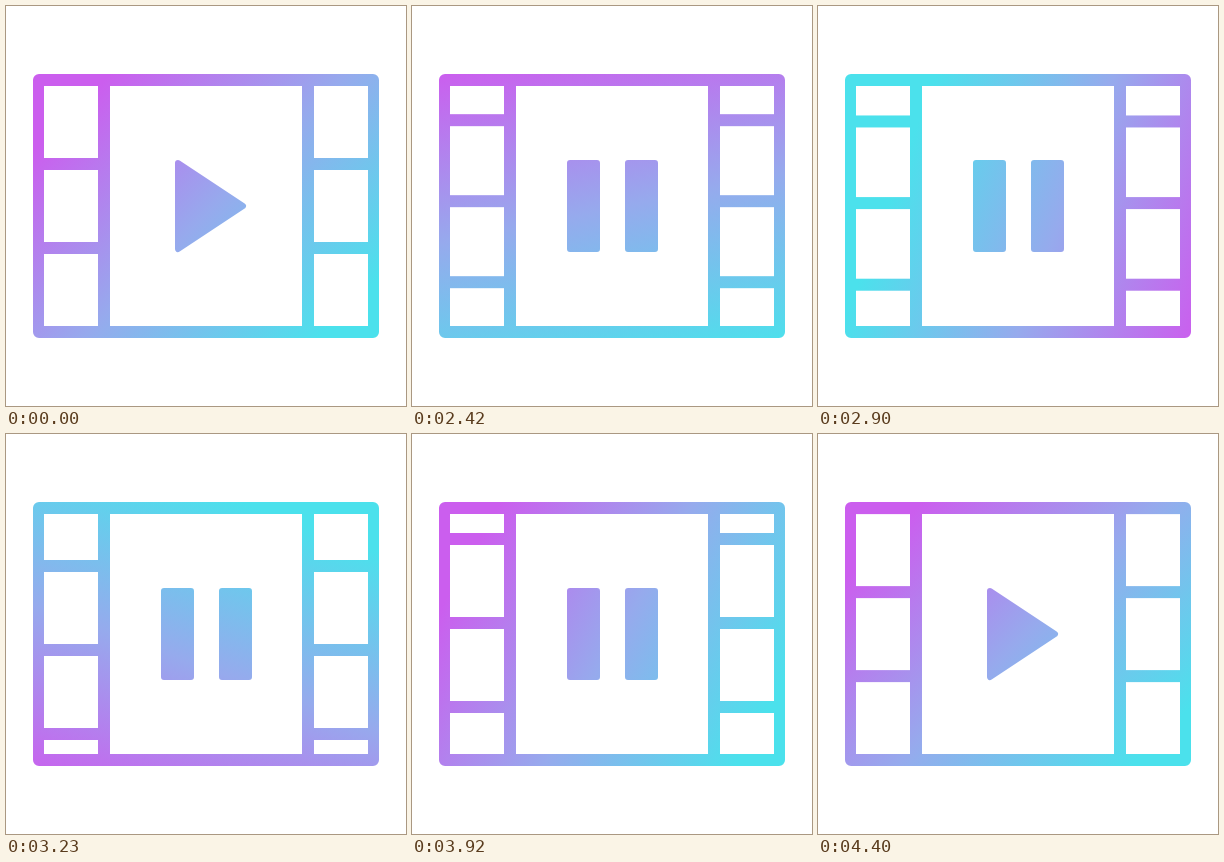
An HTML page with a canvas for the animation above (4.43 s loop, 400 px wide and 400 px high).

```html
<!DOCTYPE html>
<html lang="en">
<head>
<meta charset="utf-8">
<style>
  html, body { margin: 0; width: 100%; height: 100%; overflow: hidden; background: #fff; }
  canvas { display: block; width: 400px; height: 400px; }
</style>
</head>
<body>
<canvas id="stage" width="400" height="400"></canvas>
<script>
const ctx = document.getElementById('stage').getContext('2d');

const LOOP = 4430, HOLD = 2030, STEP = 30;
const LAST_STEP = 80;
const MORPH_END = 78.5;      // step at which the play icon is back
const PITCH = 84;            // distance between film bars
const WINDOWS = [[38, 54], [104, 192], [308, 54]];

const clamp = v => Math.min(1, Math.max(0, v));
const mix = (a, b, k) => a + (b - a) * k;

function bezierEase(x1, x2) {
  const curve = (a, b, k) => 3 * (1 - k) * (1 - k) * k * a + 3 * (1 - k) * k * k * b + k ** 3;
  return t => {
    let lo = 0, hi = 1;
    for (let i = 0; i < 24; i++) {
      const mid = (lo + hi) / 2;
      if (curve(x1, x2, mid) < t) lo = mid; else hi = mid;
    }
    return curve(0, 1, lo);
  };
}

// Smooth curve through [step, value] points, at rest at both ends
function spline(points) {
  const slopes = points.map((p, i) => {
    const a = points[i - 1], b = points[i + 1];
    return a && b ? (b[1] - a[1]) / (b[0] - a[0]) : 0;
  });
  return x => {
    let i = 0;
    while (i < points.length - 2 && x > points[i + 1][0]) i++;
    const [x0, y0] = points[i], [x1, y1] = points[i + 1];
    const w = x1 - x0, k = clamp((x - x0) / w), k2 = k * k, k3 = k2 * k;
    return y0 * (2 * k3 - 3 * k2 + 1) + slopes[i] * w * (k3 - 2 * k2 + k)
         + y1 * (3 * k2 - 2 * k3) + slopes[i + 1] * w * (k3 - k2);
  };
}

const turn = bezierEase(0.36, 0.4);
const scroll = spline([[0, 0], [14, 47], [30, 129], [41, 194], [64, 305], [81, 336]]);

function makeGradient(step) {
  const p = turn(step / LAST_STEP);
  const angle = Math.PI / 4 + p * Math.PI * 2;
  const length = 335;
  const middle = 0.48 + 0.16 * Math.sin(Math.PI * p) ** 2;
  const point = s => {
    const d = (s - middle) * length;
    return [200 + Math.cos(angle) * d, 200 + Math.sin(angle) * d];
  };
  const g = ctx.createLinearGradient(...point(0), ...point(1));
  g.addColorStop(0, '#cb5eee');
  g.addColorStop(0.5, '#96aaed');
  g.addColorStop(1, '#4be1ec');
  return g;
}

function drawFilm(step, scale) {
  ctx.save();
  ctx.translate(200, 200);
  ctx.scale(scale, scale);
  ctx.translate(-200, -200);

  ctx.beginPath();
  ctx.roundRect(27, 68, 346, 264, 6);
  for (const [x, w] of WINDOWS) ctx.rect(x, 80, w, 240);
  ctx.fill('evenodd');

  ctx.beginPath();
  ctx.rect(30, 74, 340, 252);
  ctx.clip();
  const shift = scroll(step) % PITCH;
  const squeeze = step < 40 ? 0.04 * Math.sin(Math.PI * step / 40) : 0;
  for (let i = 0; i < 5; i++) {
    const y = mix(74 + i * PITCH - shift, 200, squeeze);
    ctx.fillRect(37, y - 6, 56, 12);
    ctx.fillRect(307, y - 6, 56, 12);
  }
  ctx.restore();
}

// Play triangle at morph 0, upright bar at morph 1
function drawSymbol(morph, dx) {
  const left = mix(172, 158, morph) + dx;
  const right = mix(237, 185, morph) + dx;
  const half = 43 * morph;
  ctx.beginPath();
  ctx.moveTo(left, 157);
  ctx.lineTo(right, 200 - half);
  ctx.lineTo(right, 200 + half);
  ctx.lineTo(left, 243);
  ctx.closePath();
  ctx.fill();
  ctx.stroke();
}

function draw(time) {
  const step = time < HOLD ? 0 : Math.floor((time - HOLD) / STEP) + 1;
  const near = Math.min(step, MORPH_END - step);
  const morph = clamp(near / 6.5);
  const slide = clamp((near - 3) / 7);
  const pulse = Math.sin(Math.PI * clamp(near / 12));

  ctx.fillStyle = '#fff';
  ctx.fillRect(0, 0, 400, 400);
  ctx.fillStyle = ctx.strokeStyle = makeGradient(step);
  ctx.lineWidth = 6;
  ctx.lineJoin = 'round';
  drawFilm(step, 1 - 0.047 * pulse);
  drawSymbol(morph, 0);
  if (slide > 0) drawSymbol(morph, 58 * slide);
}

const start = performance.now();
function tick() {
  draw((performance.now() - start) % LOOP);
  requestAnimationFrame(tick);
}
tick();
</script>
</body>
</html>
```
